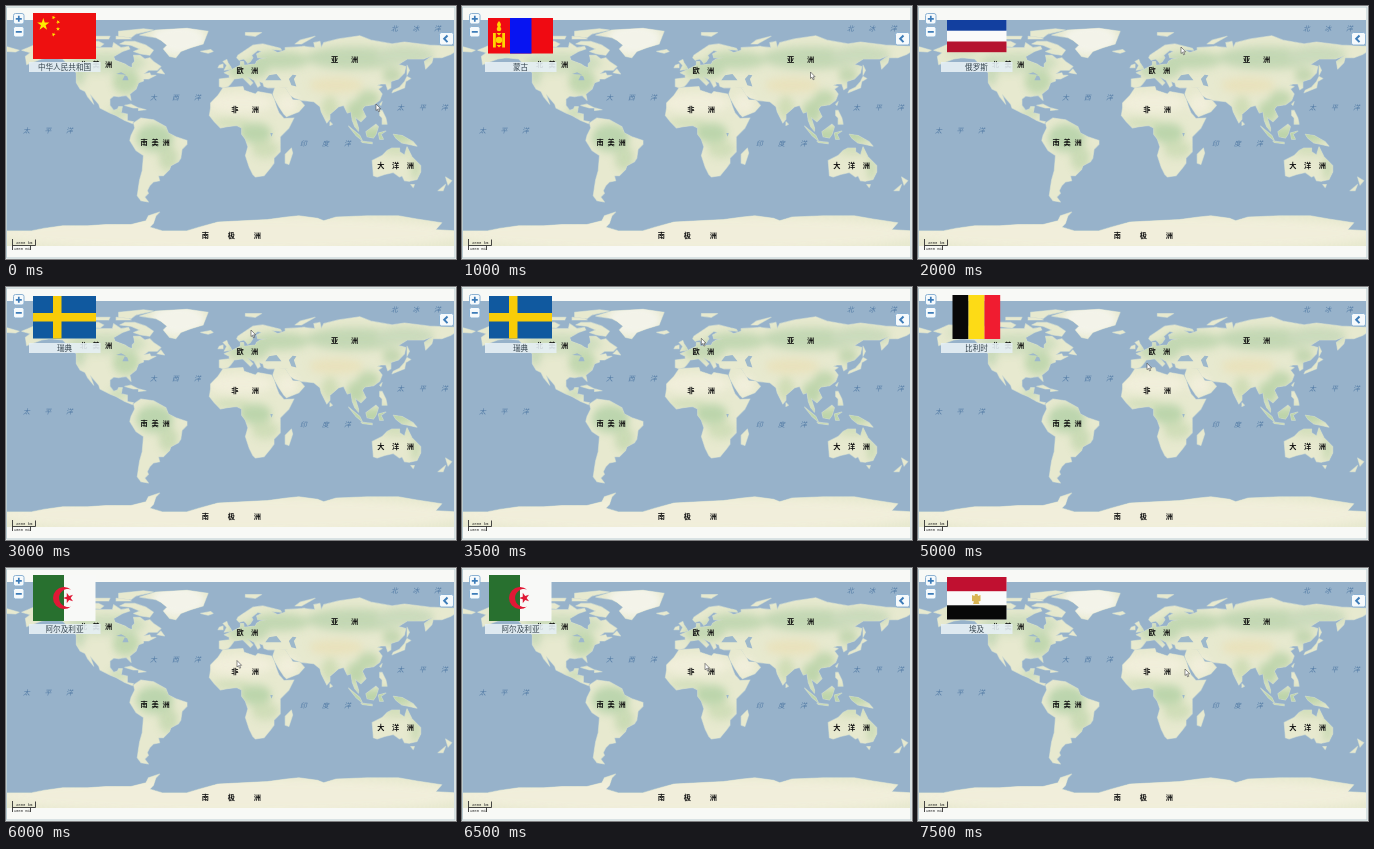
An HTML page that plays this animation: 450 by 253 pixels, repeating every 8 s.

```html
<!DOCTYPE html>
<html lang="zh">
<meta charset="utf-8">
<title>World map with flags</title>
<style>
html, body { margin: 0; width: 100%; height: 100%; overflow: hidden; background: #f8f9f6 }
svg { display: block; width: 100vw; height: 100vh }
text { font-family: "Noto Sans CJK SC", "Noto Sans CJK", sans-serif }
.land { font-size: 7.2px; font-weight: 700; fill: #111 }
.sea { font-size: 6.8px; font-weight: 500; font-style: italic; fill: #5079a4 }
.scale { font: 3.9px "Liberation Mono", monospace; fill: #222 }
.flag { display: none }
</style>
<svg viewBox="0 0 450 253">
  <defs>
    <filter id="soft" x="-50%" y="-50%" width="200%" height="200%"><feGaussianBlur stdDeviation="3.2"/></filter>
    <!-- coastlines in degrees: longitude, latitude -->
    <g id="coast">
      <path d="M-165 61L-161 64-168 66-163 68-156 71-141 70-128 70-115 68-95 68-94 72-88 68-82 69-81 67-87 65-94 61-93 58-85 55-82 53-79 52-79 55-77 57-78 62-73 62-69 59-65 60-62 57-56 53-59 50-66 50-70 47-65 48-64 46-60 46-66 43-70 43-70 41.500-74 40-76 35-81 31-80 26-82 28-84 30-90 29-94 29.500-97 27-97 22-94 18-91 19-90 21-87 21-88 16-83 15-83 10-78 9-79 7.500-85 10-92 14-97 16-105 20-106 23-113 31-110 23-115 29-117 33-121 35-124 40-124 48-130 54-135 59-145 60-152 59-164 54.500Z"/>
      <path d="M-62 66L-65 62-72 63-78 65-73 67-80 70-89 71-85 73-77 73-68 70ZM-117 70L-105 68.500-102 71-106 73-117 73ZM-90 77L-80 76-76 79-62 82-70 83-90 81ZM-125 72L-120 71-116 73-123 74ZM-110 75L-98 75-97 77-110 77ZM-92 75L-80 75-82 76-92 77ZM-59 48L-53 47-56 51ZM-85 22L-80 23-74 20-78 20ZM-74 20L-68 18.500-74 18ZM-181 69L-170 66-173 64.500-181 65Z"/>
      <path d="M-73 78L-60 82-35 83.500-18 81-20 76-22 71-32 68-40 65-44 60-49 61-54 67-51 70-56 74-60 76Z"/>
      <path d="M-78 8L-72 12-62 10.500-52 5-50 0-44-3-35-6-35-9-39-13-40-20-42-23-48-26-49-29-54-34-58-34-57-38-62-39-65-42-67-46-66-48-69-51-66-55-72-54-75-50-74-43-73-37-71-30-70-18-76-14-81-6-80-2-77 4Z"/>
      <path d="M-6 36L10 37 11 34 20 31 22 33 33 31 35 27 37 21 39 16 43 11.500 51 12 47 4 40-3 40-15 35-20 35-24 32-28 27-34 20-35 18-33 15-27 12-18 14-11 12-5 9-1 9 4 5 6-3 5-8 4-13 9-17 14-16 20-16 24-10 30ZM49-12L50-16 47-25 44-24 44-17Z"/>
      <path d="M-9 37L-9 43-1 44-1 46-5 48 2 51 8 54 8 57 10.500 57 11 54 20 55 21 57 24 59 30 60 22 60 21 63 25 65 22 66 17 62 18 60 16 57 14 55.500 12 58 10.500 59 7 58 5 60 6 62 12 66 18 70 26 71 40 67.500 41 66 33 66.500 38 64 44 66 44 68 60 69 60 36 30 36 27 37 26 40 23 41 24 38 22 36.500 19 42 13 45.500 18 40 16 38 10 44 3 43 0 39-2 37-6 36Z"/>
      <path d="M58 69L68 68 67 72 72 73 73 68 75 72 87 75 104 77.500 113 74 130 71 140 72.500 160 70 181 69 181 65 177 62.500 170 60 163 60 162 56 157 51 156 57 163 62 155 59 142 59 135 54.500 141 53 140 48 135 43 129 41 129 36 126.500 34.500 125 39 121 39 118 38 122 37 119 35 122 31 120 26 115 22.500 108 21.500 106 19 109 13 105 9 100 13 103 4 103 1.500 100 5 98 10 97 17 94 16 91 22 87 21 80 15 80 11 77.500 8 73 17 72 21 67 25 57 26 51 28 48 30 44 36 58 40Z"/>
      <path d="M48 30L50 26.500 56 26 59.500 22 55 17 45 13 43 15 39 21 35 28 34 31 36 37 44 36Z"/>
      <path d="M-5 50L1 51 0 53-2 56-3 58.500-6 57-3 54ZM-10 52L-6 52-6 55-9 54ZM-24 65L-18 63.500-14 65-16 66.500ZM12 78L20 77 25 80 12 80ZM52 71L57 71 68 77 56 74ZM130 32L135 34 140 36 141 41 145 43.500 142 45 140 41 136 36.500 131 34ZM142 46L144 50 142 54ZM120 23L121 22 122 25Z"/>
      <path d="M120 18L122 18 125 12 126 7 122 7 122 12 120 14ZM95 5.500L104-2 106-6 101-2ZM105-6.500L114-7.500 114-8.500 106-7.500ZM109 1L117 7 119 5 117-1 115-4 110-3ZM119 0L125 1.500 121-1 123-5 120-5ZM131-1L138-2 147-7 150-10.500 143-9 138-8 133-4ZM80 9L82 7 80 6Z"/>
      <path d="M114-22L122-18 126-14 130-12 136-12 136-15 140-17.500 142-11 146-19 153-26 153-31 150-37 144-38.500 140-38 138-34 136-35 131-31.500 124-33 118-35 115-34ZM145-41L148-41 147-43.500ZM173-35L178-38 175-41.500ZM173-41L171-46 167-46Z"/>
      <path d="M-181-78L-160-78-150-76-135-74-115-74-100-73-80-73-68-70-66-66-57-63-60-66-62-72-65-75-55-78-35-78-25-75-10-71 10-70 30-69 45-67 55-66 70-68 75-70 85-67 110-66 135-66 150-68.500 170-71.500 165-77 181-78 181-93-181-93Z"/>
    </g>
    <mask id="onLand" maskUnits="userSpaceOnUse" x="-182" y="-93" width="365" height="190"><use href="#coast" fill="#fff"/></mask>
    <clipPath id="mapArea"><rect x="1" y="14" width="447" height="226"/></clipPath>
  </defs>

  <rect width="450" height="253" fill="#f8f9f6"/>
  <g clip-path="url(#mapArea)">
    <rect y="14" width="450" height="226" fill="#97b2ca"/>
    <g transform="matrix(1.243 0 0 -1.255 224.500 127)">
      <use href="#coast" fill="none" stroke="#bfd0d0" stroke-width=".9" stroke-linejoin="round"/>
      <use href="#coast" fill="#e7e9cf"/>
      <g mask="url(#onLand)"><g id="tint" filter="url(#soft)" opacity=".9"></g></g>
      <path d="M28 42L31 46 37 47 41 42 35 42ZM47 43L50 46.500 53 46 51 43 53 37 49 38ZM-92 47L-88 48.500-84 46.500ZM-87 42L-85 46-83 45-82 42ZM32 0L34 0 33-3Z" fill="#9db8cb"/>
    </g>
  </g>
  <rect x=".5" y="1" width="448.500" height="251" fill="none" stroke="#b9cbd0"/>

  <g id="labels"></g>

  <g fill="#f6fafc" stroke="#8db2d2">
    <rect x="7.500" y="7.500" width="10.500" height="10.500" rx="2"/>
    <rect x="7.500" y="20.500" width="10.500" height="10.500" rx="2"/>
    <rect x="433.500" y="26.500" width="14" height="12.500" rx="2"/>
  </g>
  <g fill="none" stroke="#3d7cb8" stroke-width="1.700">
    <path d="M9.800 12.800h6M12.800 9.800v6M9.800 25.800h6"/>
    <path d="M441.500 29.500l-3.300 3.300 3.300 3.300" stroke-width="2"/>
  </g>
  <path d="M6.500 233v11M6.500 239.500h23v-6M24.500 239.500v4.500" fill="none" stroke="#333" stroke-width=".9"/>
  <text class="scale" x="10" y="237.500">2000 km</text>
  <text class="scale" x="7.700" y="243.500">1000 mi</text>

  <rect x="23" y="56" width="71.500" height="10" fill="#e6f0f4" opacity=".9"/>
  <text id="country" x="58.500" y="63.800" text-anchor="middle" font-size="7.600" fill="#34434d"></text>

  <g class="flag">
    <rect x="27" y="7" width="63" height="46" fill="#ee1010"/>
    <g id="stars" fill="#ffec00"></g>
  </g>
  <g class="flag">
    <rect x="26" y="12" width="65" height="35.500" fill="#f00a12"/>
    <rect x="48" y="12" width="21.500" height="35.500" fill="#0714f2"/>
    <g fill="#ffd500">
      <path d="M37 15q4 4 0 7q-4-3 0-7M31 27h2.800v14.500h-2.800zM40.200 27h2.800v14.500h-2.800zM34.500 27h5l-2.500 2.500zM34.500 39h5l-2.500 2.500z"/>
      <circle cx="37" cy="23" r="2.300"/><circle cx="37" cy="34" r="3.200"/>
    </g>
  </g>
  <g class="flag">
    <rect x="29" y="14" width="59.500" height="32" fill="#fafafa"/>
    <rect x="29" y="14" width="59.500" height="10.700" fill="#123f9f"/>
    <rect x="29" y="35.500" width="59.500" height="10.700" fill="#b5132f"/>
  </g>
  <g class="flag">
    <rect x="27" y="9" width="63" height="42.500" fill="#10599f"/>
    <path d="M47 9h8.500v42.500h-8.500zM27 26h63v8.500h-63z" fill="#f8cc08"/>
  </g>
  <g class="flag">
    <rect x="34.500" y="8" width="16" height="44" fill="#080808"/>
    <rect x="50.500" y="8" width="16" height="44" fill="#fddb16"/>
    <rect x="66.500" y="8" width="15.700" height="44" fill="#f01c30"/>
  </g>
  <g class="flag">
    <rect x="27" y="7" width="62.500" height="46" fill="#f8f9f7"/>
    <rect x="27" y="7" width="31" height="46" fill="#28702f"/>
    <path d="M65 21.500A11 11 0 1 0 65 38.500A9 9 0 1 1 65 21.500Z" fill="#e01835"/>
    <g id="lone" fill="#e01835"></g>
  </g>
  <g class="flag">
    <rect x="29" y="9" width="59.500" height="42.500" fill="#fafafa"/>
    <rect x="29" y="9" width="59.500" height="14.200" fill="#c01030"/>
    <rect x="29" y="37.300" width="59.500" height="14.200" fill="#080808"/>
    <path d="M57 26h2.500l.5 2 2.500-1v6l-2 .5 1 2.500h-6.500l1-2.500-2-.5v-6l2.500 1z" fill="#d9b453"/>
  </g>

  <path id="cursor" d="M0 0V6.500L1.500 5.200 2.600 7.800 3.700 7.300 2.600 4.800H4.600Z" fill="#fff" stroke="#444" stroke-width=".6"/>
</svg>
<script>
const $ = id => document.getElementById(id);

// soft vegetation and desert tones: colour, lon, lat, rx, ry
const tints = [
  ['#bdd5ac', -84, 41, 11, 10], ['#cbdcbb', -100, 56, 32, 8], ['#c6d8b8', -122, 50, 6, 12],
  ['#d3dfc0', -145, 64, 14, 4], ['#c6d9b5', -90, 16, 8, 4], ['#b7d3aa', -61, -4, 15, 11],
  ['#c7d9b2', -50, -20, 8, 10], ['#b7d3a8', 20, 0, 13, 8], ['#c9dab2', 0, 8, 15, 3],
  ['#cddcb6', 28, -13, 11, 7], ['#f2efdc', 8, 24, 27, 8], ['#f2efdc', 46, 23, 9, 8],
  ['#c0d6b0', 14, 50, 17, 7], ['#bed5af', 40, 58, 24, 7], ['#bfd5b1', 100, 60, 40, 9],
  ['#c8d9ba', 140, 62, 24, 8], ['#e9e1ba', 85, 38, 22, 6], ['#bdd4aa', 111, 27, 9, 7],
  ['#bad3a8', 101, 17, 8, 9], ['#cddbb4', 80, 20, 7, 9], ['#b7d1a6', 118, -2, 32, 7],
  ['#bfd4ad', 130, 46, 8, 6], ['#cad9b2', 135, -14, 14, 3], ['#c8d9b2', 149, -28, 4, 10],
  ['#f4f4ec', -42, 75, 22, 13], ['#f2efdc', 0, -80, 190, 14]
];
$('tint').innerHTML = tints.map(([c, x, y, rx, ry]) =>
  `<ellipse cx="${x}" cy="${y}" rx="${rx}" ry="${ry}" fill="${c}"/>`).join('');

// text, x, baseline, distance between characters
const label = (cls, size) => ([s, x, y, step]) =>
  `<text class="${cls}" x="${x}" y="${y}" letter-spacing="${step - size}">${s}</text>`;
$('labels').innerHTML = [
  ['北美洲', 74, 60.5, 12.5], ['欧洲', 230.5, 66.5, 14.5], ['亚洲', 325, 55.5, 20],
  ['非洲', 225.3, 105.5, 20.5], ['南美洲', 134.5, 139.3, 11], ['大洋洲', 371.2, 161.5, 14.8],
  ['南极洲', 195.7, 232.3, 26]
].map(label('land', 7.2)).join('') + [
  ['北冰洋', 385, 24.5, 21.5], ['大西洋', 144, 93.7, 22], ['太平洋', 17, 126.5, 21.5],
  ['印度洋', 294, 139.7, 22], ['太平洋', 391, 103.7, 22]
].map(label('sea', 6.8)).join('');

function star(cx, cy, r, turn = -90) {
  const pts = [...Array(10)].map((_, i) => {
    const a = (turn + i * 36) * Math.PI / 180, d = i % 2 ? r * .382 : r;
    return [cx + d * Math.cos(a), cy + d * Math.sin(a)];
  });
  return `<polygon points="${pts.join(' ')}"/>`;
}
$('stars').innerHTML = star(37.3, 18.5, 6.4) +
  [[47.5, 11.5], [52, 16], [52, 23], [47.5, 28.5]].map(([x, y]) =>
    star(x, y, 2.2, Math.atan2(18.5 - y, 37.3 - x) * 180 / Math.PI)).join('');
$('lone').innerHTML = star(62.5, 30, 5.6, 180);

const names = ['中华人民共和国', '蒙古', '俄罗斯', '瑞典', '比利时', '阿尔及利亚', '埃及'];
const flags = document.querySelectorAll('.flag');
const starts = [0, 1000, 1500, 2500, 4000, 5500, 7000];
// pointer stops: time, x, y
const stops = [[0, 370, 98], [1000, 348.5, 66], [2000, 263, 41], [3000, 245, 43],
  [4500, 228, 68], [6000, 231, 92.5], [7500, 267, 101]];

function draw(now) {
  const t = Math.floor(now % 8000 / 500) * 500;
  const shown = starts.filter(s => s <= t).length - 1;
  flags.forEach((f, i) => f.style.display = i === shown ? 'inline' : 'none');
  $('country').textContent = names[shown];

  const next = Math.max(1, stops.findIndex(s => s[0] >= t));
  const [t0, x0, y0] = stops[next - 1], [t1, x1, y1] = stops[next];
  const k = (t - t0) / (t1 - t0);
  $('cursor').setAttribute('transform', `translate(${x0 + (x1 - x0) * k} ${y0 + (y1 - y0) * k})`);
}

const begin = performance.now();
(function loop() {
  draw(performance.now() - begin);
  requestAnimationFrame(loop);
})();
</script>
</html>
```
